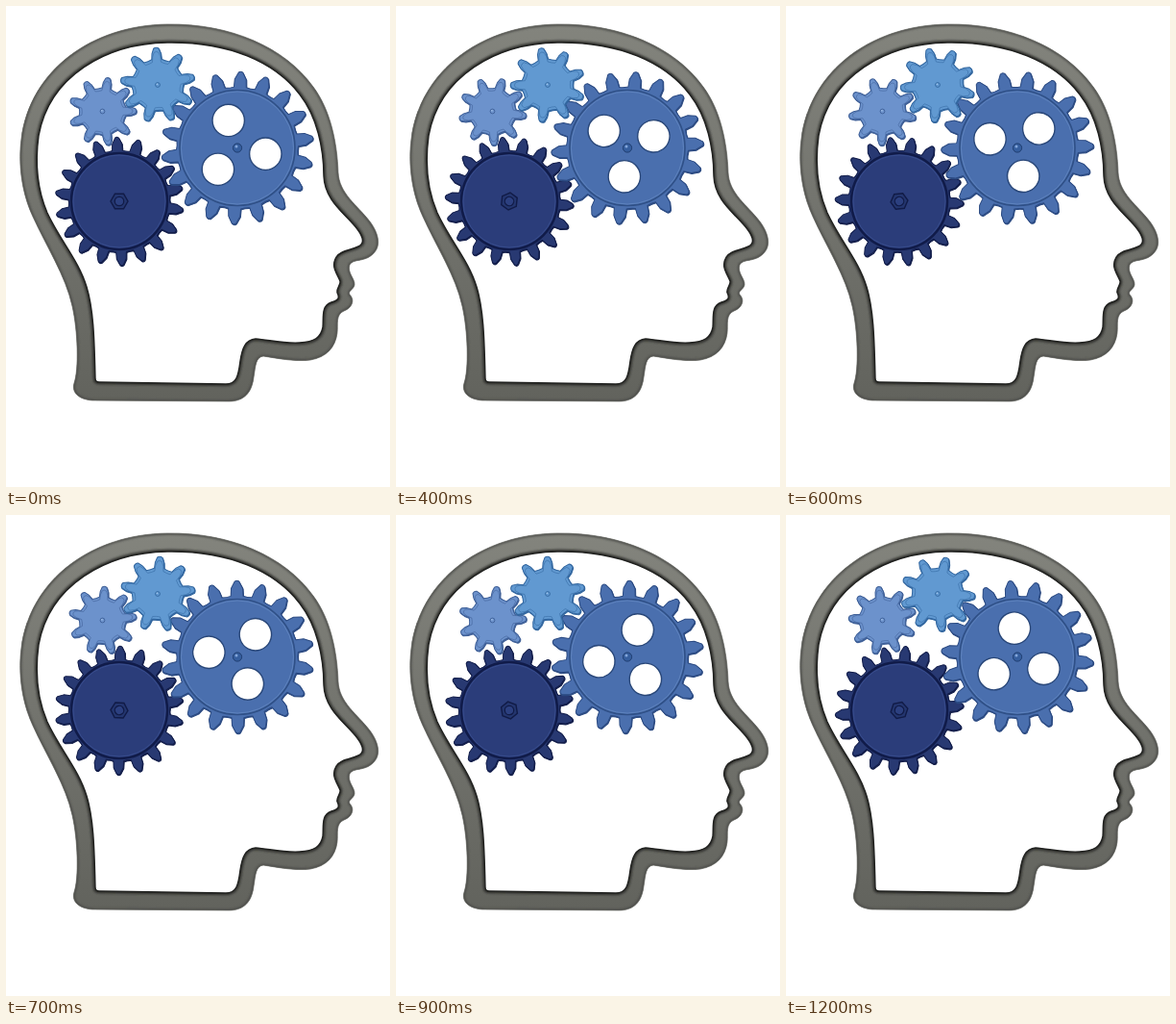
Animation of 400x500 px, one loop 1.3 s. Source, as an HTML page:

```html
<!DOCTYPE html>
<html lang="en">
<head>
<meta charset="utf-8">
<title>Thinking gears</title>
<style>
  html, body { margin: 0; width: 100%; height: 100%; overflow: hidden; background: #fff; }
  svg { display: block; width: 400px; height: 500px; }
</style>
</head>
<body>
<svg id="stage" viewBox="0 0 400 500" xmlns="http://www.w3.org/2000/svg">
  <defs>
    <filter id="soft" x="-10%" y="-10%" width="120%" height="120%"><feGaussianBlur stdDeviation="1.2"/></filter>
    <linearGradient id="metal" x1="0" y1="0" x2="0" y2="1">
      <stop offset="0" stop-color="#83847d"/>
      <stop offset="0.5" stop-color="#72736d"/>
      <stop offset="1" stop-color="#62635d"/>
    </linearGradient>
    <clipPath id="band"><path id="bandClip" clip-rule="evenodd"/></clipPath>
  </defs>
  <g id="gears"></g>
  <g id="head"></g>
</svg>
<script>
const STEP = 100, STEPS = 13;
const TOOTH_STEP = 0.45; // share of a tooth pitch per step

const gearSpecs = [
  { x: 118, y: 203, teeth: 18, root: 53, tip: 67, dir: 1, phase: -2.2,
    fill: '#283972', edge: '#121d4a', kind: 'nut' },
  { x: 241, y: 147.5, teeth: 18, root: 63.5, tip: 79.5, dir: -1, phase: 2.6,
    fill: '#4a6fae', edge: '#2b4a82', kind: 'holes' },
  { x: 100.5, y: 109.5, teeth: 9, root: 24.5, tip: 35.5, dir: -1, phase: 9.5,
    fill: '#6c92cc', edge: '#3e5f97', kind: 'small' },
  { x: 158, y: 82, teeth: 9, root: 27, tip: 39, dir: 1, phase: -2.5,
    fill: '#6199d1', edge: '#32669f', kind: 'small' }
];

const outer = 'M168 19 C232 18 290 42 320 84 C338 108 345 142 346 173 C347 195 366 207 379 224 ' +
  'C388 236 391 249 383 257 C374 267 362 262 358 269 C355 277 364 284 363 290 C362 295 356 296 358 300 ' +
  'C364 306 360 314 352 317 C343 321 346 331 345 340 C343 355 334 365 317 368 C300 370 282 366 268 364 ' +
  'C260 365 260 374 258 386 C256 402 248 411 232 411 L90 410 C76 409 68 402 71 392 ' +
  'C76 378 75 338 69 312 C62 280 42 250 28 219 C15 191 13 161 16 138 C25 67 89 20 168 19 Z';
const inner = 'M168 38 C232 37 280 58 306 92 C324 115 331 148 331 177 C332 203 354 216 366 232 ' +
  'C372 240 374 247 367 250 C359 254 348 254 344 261 C338 271 345 278 348 286 C349 290 344 293 345 298 ' +
  'C348 304 346 306 339 308 C328 312 331 323 330 334 C328 345 321 349 306 350 C288 351 274 347 260 346 ' +
  'C249 347 246 356 244 369 C242 385 240 393 229 393 L97 391 Q93 391 93 387 ' +
  'C92 354 92 318 84 292 C76 265 56 243 43 215 C31 187 31 157 34 135 C45 73 104 39 168 38 Z';

function add(parent, tag, attrs) {
  const el = document.createElementNS('http://www.w3.org/2000/svg', tag);
  for (const key in attrs) el.setAttribute(key, attrs[key]);
  return parent.appendChild(el);
}

// Angles are in degrees, clockwise from straight up.
function polar(r, deg) {
  const a = deg * Math.PI / 180;
  return [r * Math.sin(a), -r * Math.cos(a)];
}

const point = (r, deg) => polar(r, deg).map(v => v.toFixed(2)).join(' ');

function teethPath({ teeth, root, tip, kind }) {
  const pitch = 360 / teeth, depth = tip - root;
  const [base, mid, top] = kind === 'small' ? [0.27, 0.2, 0.1] : [0.29, 0.24, 0.08];
  let d = '';
  for (let i = 0; i < teeth; i++) {
    const p = (r, k) => point(r, (i + k) * pitch);
    d += `${i ? 'L' : 'M'}${p(root, -base)} L${p(root + depth * 0.5, -mid)} L${p(tip - 1, -top)} ` +
      `Q${p(tip + 0.7, 0)} ${p(tip - 1, top)} L${p(root + depth * 0.5, mid)} L${p(root, base)} ` +
      `Q${p(root - 1, 0.5)} ${p(root, 1 - base)} `;
  }
  return d + 'Z';
}

function ring(parent, r, stroke, width = 1, fill = 'none') {
  return add(parent, 'circle', { r, fill, stroke, 'stroke-width': width });
}

const faces = {
  nut(g) {
    ring(g, 50, '#101b49', 2.5, '#2b3d7a');
    ring(g, 48, '#3c5192', 0.8);
    const spin = add(g, 'g', {});
    const hex = r => [0, 1, 2, 3, 4, 5].map(i => point(r, i * 60 + 30)).join(' ');
    add(spin, 'polygon', { points: hex(9), fill: '#24366f', stroke: '#111b46', 'stroke-width': 1.4 });
    ring(spin, 4.7, '#111b46', 1.3, '#2c4080');
    return spin;
  },
  holes(g) {
    ring(g, 60, '#2f5087', 1.6);
    ring(g, 58.5, '#6488c2', 0.8);
    const spin = add(g, 'g', {});
    for (const deg of [-18, 102, 222]) {
      const [cx, cy] = polar(30, deg);
      add(spin, 'circle', { cx, cy, r: 16.7, fill: '#fff', stroke: '#294779', 'stroke-width': 1.4 });
    }
    ring(g, 4.6, '#203e70', 1, '#355e9e');
    add(g, 'circle', { cx: -1, cy: -1.5, r: 1.5, fill: '#83a6da' });
    return spin;
  },
  small(g, spec) {
    ring(g, 2.4, spec.edge, 0.9, spec.fill);
    add(g, 'circle', { cx: -0.6, cy: -0.8, r: 0.8, fill: '#a9c9ee' });
  }
};

function makeGear(spec) {
  const g = add(document.getElementById('gears'), 'g', { transform: `translate(${spec.x} ${spec.y})` });
  const d = teethPath(spec);
  const layer = (fill, dx, dy) => {
    const shift = add(g, 'g', { transform: `translate(${dx} ${dy})` });
    return add(shift, 'path', { d, fill, stroke: spec.edge, 'stroke-width': 1, 'stroke-linejoin': 'round' });
  };
  const parts = [layer(spec.edge, 0.6, 0.9), layer(spec.fill, 0, 0)];
  if (spec.kind === 'small') {
    const inset = add(g, 'path', { d, fill: 'none', stroke: spec.edge, 'stroke-width': 0.9, opacity: 0.6 });
    inset.dataset.scale = 0.89;
    parts.push(inset);
  }
  return { ...spec, parts, face: faces[spec.kind](g, spec) };
}

function drawHead() {
  const head = document.getElementById('head');
  const d = outer + ' ' + inner;
  document.getElementById('bandClip').setAttribute('d', d);
  add(head, 'path', { d, fill: 'url(#metal)', 'fill-rule': 'evenodd' });
  const shade = add(head, 'g', { 'clip-path': 'url(#band)', fill: 'none' });
  add(shade, 'path', { d: outer, stroke: '#4b4c48', 'stroke-width': 3, filter: 'url(#soft)' });
  add(shade, 'path', { d: inner, stroke: '#30312e', 'stroke-width': 4.5, filter: 'url(#soft)' });
  add(head, 'path', { d: outer, fill: 'none', stroke: '#666762', 'stroke-width': 0.7 });
  add(head, 'path', { d: inner, fill: 'none', stroke: '#20211f', 'stroke-width': 1.4 });
}

const gears = gearSpecs.map(makeGear);
drawHead();

function pose(step) {
  for (const gear of gears) {
    const turn = gear.dir * step * TOOTH_STEP * 360 / gear.teeth;
    for (const part of gear.parts) {
      part.setAttribute('transform', `rotate(${gear.phase + turn}) scale(${part.dataset.scale || 1})`);
    }
    if (gear.face) gear.face.setAttribute('transform', `rotate(${turn})`);
  }
}

const start = performance.now();
function tick() {
  const elapsed = Math.max(0, performance.now() - start);
  pose(Math.floor(elapsed / STEP) % STEPS);
  requestAnimationFrame(tick);
}
pose(0);
requestAnimationFrame(tick);
</script>
</body>
</html>
```
